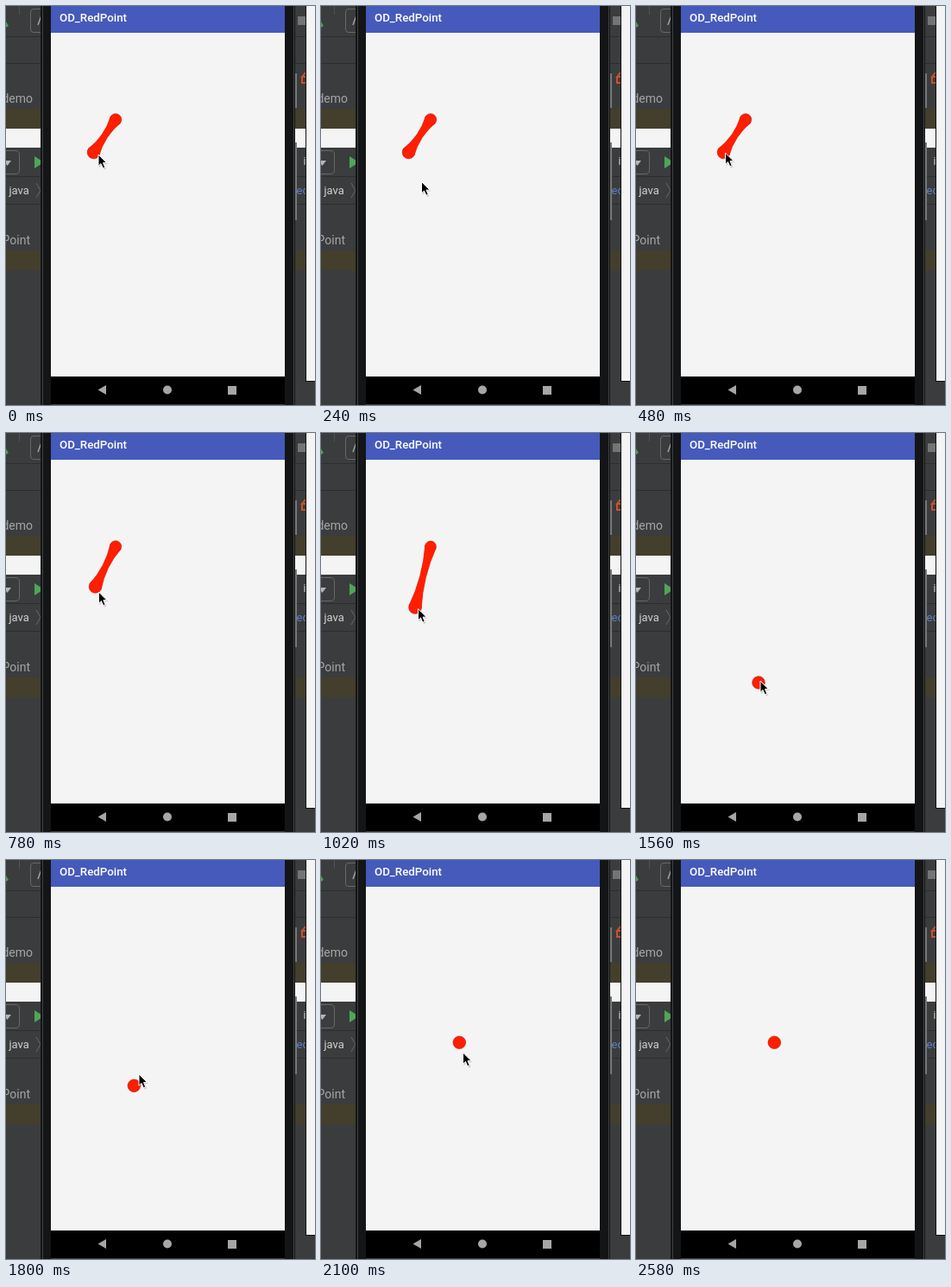
Recreate the animation shown at these times as an HTML page. Size 358 px wide and 462 px high, loop 2.88 s.

```html
<!DOCTYPE html>
<html lang="en">
<head>
<meta charset="utf-8">
<title>Red point</title>
<style>
  html, body { margin: 0; width: 100%; height: 100%; overflow: hidden; background: #3b3c3d; }
  svg { display: block; width: 358px; height: 462px; }
  text { font-family: Roboto, sans-serif; }
  .line { fill: none; stroke: #2c2d2e; }
  .edge { fill: none; stroke: #66686a; }
  .label { fill: #a4a5a6; font-size: 14px; }
  .red { fill: #ff1e00; stroke: #d01a08; stroke-width: .7; }
</style>
</head>
<body>
<svg viewBox="0 0 358 462">
  <!-- editor behind the phone -->
  <rect width="358" height="462" fill="#3b3c3d"/>
  <path class="line" d="M0 35.5H358M0 66.5H358M0 197.5H358M0 229.5H358"/>
  <path fill="#443e2d" d="M0 119H358V142H0ZM0 283H358V306H0Z"/>
  <path fill="#f4f4f4" d="M0 142H358V164H0Z"/>
  <path d="M0 18L3 23L0 25Z" fill="#4c9f56"/>
  <path class="line" d="M15.5 0V10" style="stroke:#515355"/>
  <path class="edge" d="M42 3.5H32Q28.5 3.5 28.5 7V27Q28.5 30.5 32 30.5H42"/>
  <path d="M37 22L41 11" stroke="#a4a5a6" stroke-width="1.4"/>
  <text class="label" x="31" y="112" text-anchor="end">demo</text>
  <path class="edge" d="M0 167.5H11Q15.5 167.5 15.5 172V190Q15.5 194.5 11 194.5H0"/>
  <path d="M-3 179H6L1.5 185Z" fill="#b4b5b6"/>
  <path d="M33 174L44 181L33 188Z" fill="#4fa55a"/>
  <text x="3.5" y="218" font-size="13" fill="#d0d0d0">java</text>
  <path class="edge" d="M35 205L40 213.500L35 222"/>
  <text class="label" x="28" y="276" text-anchor="end">Point</text>

  <rect x="338" y="12" width="9" height="10" fill="#727476"/>
  <path d="M347 77L343 82H347M343 82V89H348" fill="none" stroke="#c9512f" stroke-width="2"/>
  <path d="M336 78V118M336 158V248" stroke="#77797b" stroke-width="2"/>
  <text x="344.500" y="184" font-size="12" fill="#d0d0d0">i</text>
  <text x="336.500" y="218" font-size="13" fill="#5f82c4">ec</text>
  <path d="M347 0H358V435H347Z" fill="#111"/>
  <path d="M348 0H358V434H348Z" fill="#f4f4f4"/>

  <!-- phone -->
  <rect x="40" width="295" height="462" fill="#141516"/>
  <path d="M42.500 0V462M333.500 0V462" stroke="#3e4042"/>
  <rect x="52" width="271" height="31" fill="#465abb"/>
  <rect x="52" y="31" width="271" height="398" fill="#f4f4f4"/>
  <rect x="52" y="429" width="271" height="32" fill="#000"/>
  <path d="M52 461.500H323" stroke="#3a3b3c"/>
  <text x="62" y="18" font-size="13.300" font-weight="500" fill="#fff">OD_RedPoint</text>
  <g fill="#a6a6a6">
    <path d="M106.500 444.500L116 439V450Z"/>
    <circle cx="187" cy="444.500" r="5"/>
    <rect x="257" y="440" width="10" height="10"/>
  </g>

  <path id="band" class="red"/>
  <circle id="anchor" class="red"/>
  <circle id="point" class="red" r="7.300"/>
  <path id="joint" fill="#ff1e00"/>
  <g id="cursor">
    <path d="M1 2V15L4 12L6.500 17.500L9 16.500L7 11H11Z" fill="#000" opacity=".18"/>
    <path d="M0 0V13.300L3 10.500L5.300 15.800L7.700 14.800L5.500 9.600H9.600Z"
          fill="#000" stroke="#fff" stroke-width="1" stroke-linejoin="round"/>
  </g>
</svg>
<script>
  const LOOP = 2880, STEP = 60;
  const DRAG = 540, SNAP = 1380, DROP = 1980, LEAVE = 2580;
  const HOME = { x: 127, y: 131.5 };
  const RADIUS = 7.3;

  // cursor tip: time, x, y
  const track = [
    [0, 107, 172], [180, 115, 200], [300, 118, 207], [420, 108, 182],
    [480, 103.5, 170], [540, 104, 169.5], [720, 106, 178], [960, 111.5, 202],
    [1020, 112.5, 203.5], [1080, 114, 209], [1200, 119.5, 240], [1260, 120.5, 251],
    [1380, 130, 272], [1500, 144.5, 289], [1560, 144, 287], [1620, 144.5, 288],
    [1800, 154, 248], [1980, 162.8, 211.3], [2100, 164.5, 223], [2160, 165, 230],
    [2340, 168, 330], [2400, 175, 355], [2460, 167, 395], [2520, 152, 420]
  ];

  const $ = id => document.getElementById(id);
  const [band, anchor, point, joint, cursor] =
    ["band", "anchor", "point", "joint", "cursor"].map($);

  function tipAt(t) {
    const i = track.findIndex(k => k[0] > t);
    if (i < 0) return { x: track.at(-1)[1], y: track.at(-1)[2] };
    const [t0, x0, y0] = track[i - 1], [t1, x1, y1] = track[i];
    const u = (t - t0) / (t1 - t0);
    return { x: x0 + (x1 - x0) * u, y: y0 + (y1 - y0) * u };
  }

  function place(circle, p, r) {
    circle.setAttribute("cx", p.x);
    circle.setAttribute("cy", p.y);
    circle.setAttribute("r", r);
  }

  // two quadratic sides that narrow towards the midpoint
  function bandPath(a, ra, b, rb) {
    const d = Math.hypot(b.x - a.x, b.y - a.y);
    const nx = (a.y - b.y) / d, ny = (b.x - a.x) / d;
    const mid = `${(a.x + b.x) / 2} ${(a.y + b.y) / 2}`;
    const side = (p, r) => `${p.x + nx * r} ${p.y + ny * r}`;
    return `M${side(a, ra)}Q${mid} ${side(b, rb)}L${side(b, -rb)}Q${mid} ${side(a, -ra)}Z`;
  }

  function draw(t) {
    const tip = tipAt(t);
    cursor.setAttribute("transform", `translate(${tip.x} ${tip.y})`);
    cursor.style.display = t < LEAVE ? "" : "none";

    // the point trails the cursor by one step
    const p = tipAt(Math.min(Math.max(t - STEP, DRAG), DROP));
    p.x -= 2.5;
    place(point, p, RADIUS);

    const held = t < SNAP;
    for (const el of [band, anchor, joint]) el.style.display = held ? "" : "none";
    if (!held) return;
    const r = RADIUS - Math.hypot(p.x - HOME.x, p.y - HOME.y) / 80;
    place(anchor, HOME, r);
    band.setAttribute("d", bandPath(HOME, r, p, RADIUS));
    joint.setAttribute("d", bandPath(HOME, r - .3, p, RADIUS - .3));
  }

  const start = performance.now();
  function tick() {
    const t = (performance.now() - start) % LOOP;
    draw(Math.floor(t / STEP) * STEP);
    requestAnimationFrame(tick);
  }
  tick();
</script>
</body>
</html>
```
